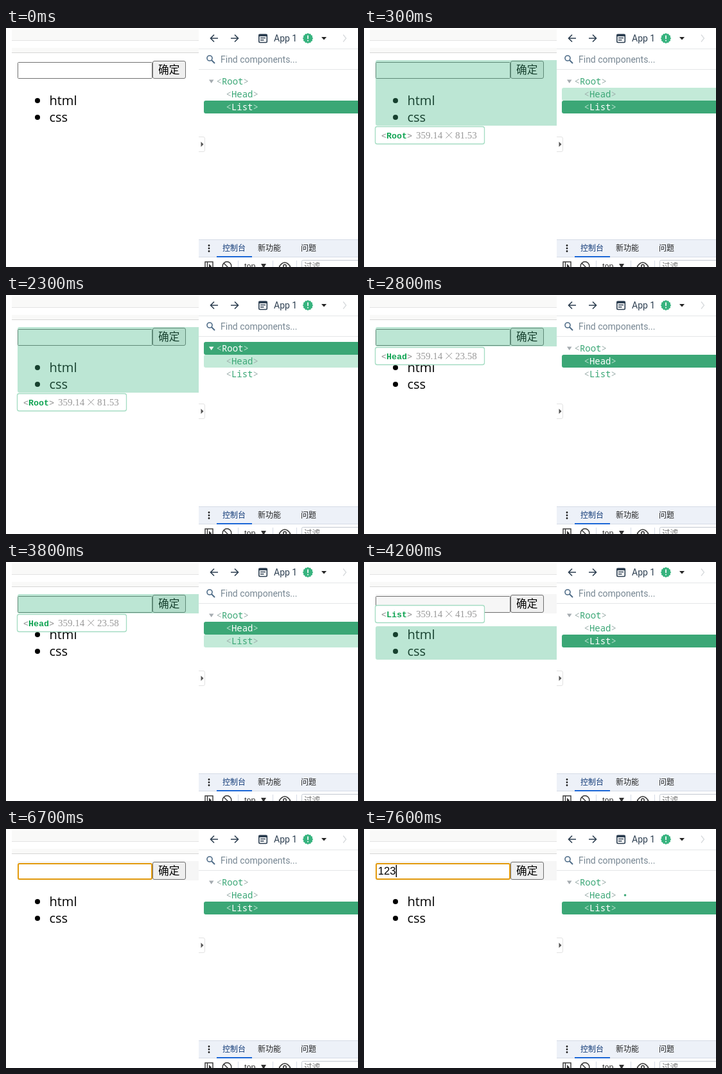
Animation, 548 px wide and 372 px high, one loop 8000 ms. Source, as an HTML page:

```html
<!DOCTYPE html>
<html lang="zh">
<head>
<meta charset="utf-8">
<title>Component inspector</title>
<style>
html, body { margin: 0; width: 100%; height: 100%; overflow: hidden; background: #fff; }
svg { display: block; }
text { white-space: pre; }
.cjk { font-family: "Noto Sans CJK SC", "Noto Sans CJK", "Noto Sans CJK JP", sans-serif; }
.list { font: 20px "Open Sans", sans-serif; }
.ui { font: 14px Roboto, sans-serif; }
.arial { font-family: "Liberation Sans", Arial, sans-serif; }
.tag { font: bold 13.3px "Liberation Mono", monospace; fill: #0fa352; }
.tag .b { font-weight: normal; fill: #8a8a8a; }
.size { font: 15px "Liberation Serif", serif; fill: #999; }
.row rect { fill: none; }
.row text { font: 14px "Noto Sans Mono", monospace; fill: #3ba776; }
.row .b { fill: #9fb0ad; }
.row.hover rect { fill: #c3ead8; }
.row.sel rect { fill: #3ba776; }
.row.sel text { fill: #fff; font-weight: 500; }
.row.sel .b { fill: #b5dfcb; font-weight: 400; }
.line { fill: none; stroke: #2c3e50; stroke-width: 1.6; }
.rule { fill: none; stroke: #e4e6e8; }
</style>
</head>
<body>
<svg width="548" height="372" viewBox="0 0 548 372">
  <rect width="548" height="372" fill="#fff"/>

  <!-- page -->
  <path d="M9 2H300V19H9Z M9 31H300V38H9Z" fill="#f9f9f8"/>
  <path d="M9 19.5H300" stroke="#e3e3e3"/>
  <path d="M9 38.5H300" stroke="#d6d6d6"/>
  <rect id="band" x="18" y="50" width="282" height="30" fill="#f6f6f6"/>
  <rect id="field" x="18.5" y="53.5" width="209" height="25" rx="1"/>
  <text id="typed" class="arial" x="21.8" y="71" font-size="16.67"></text>
  <rect id="caret" y="56" width="1.5" height="19"/>
  <rect x="228.5" y="51.5" width="51" height="27" rx="2.5" fill="#efefef" stroke="#707070"/>
  <text class="cjk" x="237" y="71" font-size="16.67">确定</text>
  <circle cx="49" cy="113" r="4"/>
  <circle cx="49" cy="139" r="4"/>
  <text class="list" x="67.5" y="120">html</text>
  <text class="list" x="67.5" y="146">css</text>

  <!-- highlight and its label -->
  <g id="overlay">
    <rect id="area" x="18" width="300" rx="3" fill="rgba(65,184,131,.35)"/>
    <g id="label">
      <rect x="17.5" y=".5" width="170" height="27" rx="3" fill="#fff" stroke="#a3dcc2" stroke-width="1.3"/>
      <text class="tag" x="27" y="18.5"><tspan class="b">&lt;</tspan><tspan id="tagName"></tspan><tspan class="b">&gt;</tspan></text>
      <text class="size" x="81" y="19">359.14</text>
      <path d="M127.5 9L137 18.5M137 9L127.5 18.5" stroke="#999"/>
      <text class="size" id="tall" x="142" y="19"></text>
    </g>
  </g>

  <!-- inspector -->
  <rect x="300" width="248" height="372" fill="#fff"/>
  <path class="rule" d="M300 32.5H548M300 64.5H548"/>
  <g class="line">
    <path d="M330 16H319M324 10.5L318.500 16L324 21.5M350 16H361M356 10.500L361.500 16L356 21.500"/>
    <rect x="393.800" y="10" width="12.500" height="12.500" rx="1.500"/>
    <path d="M393.500 11.500H406.500" stroke-width="3"/>
    <path d="M396 15.500H404M396 18.700H401.500" stroke-width="1.400"/>
  </g>
  <text class="ui" x="417" y="20.500" fill="#2c3e50">App 1</text>
  <path id="badge" fill="#36b37e"/>
  <path d="M470 11.500V17M470 18.700V20.500" stroke="#fff" stroke-width="1.700"/>
  <path d="M491 14H499L495 18.500Z" fill="#222"/>
  <path d="M525 10.500L529.500 16L525 21.500" fill="none" stroke="#d5d8db" stroke-width="1.200"/>
  <circle class="line" cx="317" cy="47" r="4" style="stroke:#4d6b87"/>
  <path class="line" d="M320 50L325 55" style="stroke:#4d6b87;stroke-width:2"/>
  <text class="ui" x="334" y="54" fill="#768692">Find components...</text>

  <g id="rows"></g>
  <path id="arrow" d="M316 80.500H323.500L319.700 86Z"/>
  <circle id="dot" cx="406.500" cy="103" r="1.800" fill="#3ba776"/>

  <path d="M300 169.500H307Q309.500 169.500 309.500 172V190Q309.500 192.500 307 192.500H300" fill="#fff" stroke="#e2e2e2"/>
  <path d="M303.500 177V185L307.500 181Z" fill="#555"/>

  <!-- console drawer -->
  <rect x="300" y="329" width="248" height="28" fill="#edf1f8"/>
  <path d="M300 329.500H548M300 356.500H548" stroke="#d5dbe6"/>
  <rect x="328" y="355" width="55" height="2" fill="#1a66d6"/>
  <g fill="#222">
    <circle cx="316" cy="338.500" r="1.400"/>
    <circle cx="316" cy="343" r="1.400"/>
    <circle cx="316" cy="347.500" r="1.400"/>
  </g>
  <g class="cjk" font-size="12" fill="#222">
    <text x="337" y="347" fill="#123b78">控制台</text>
    <text x="392" y="347">新功能</text>
    <text x="459" y="347">问题</text>
  </g>
  <g fill="none" stroke="#333" stroke-width="1.400">
    <rect x="310" y="364" width="12" height="12"/>
    <path d="M313.500 364V372"/>
    <circle cx="344" cy="370.500" r="6.800"/>
    <path d="M339 366L349 376M425.500 371Q434 359 442.500 371Q434 383 425.500 371Z"/>
    <circle cx="434" cy="370.500" r="2.300"/>
  </g>
  <path d="M316 367V375L320 371Z M397 367H405L401 374Z" fill="#333"/>
  <path d="M361.500 362V372M415.500 362V372M452.500 362V372" stroke="#d5dbe6"/>
  <text class="arial" x="371" y="374.500" font-size="12.500" fill="#333">top</text>
  <rect x="460.500" y="361.500" width="100" height="20" rx="2" fill="#fff" stroke="#c3c8d0"/>
  <text class="cjk" x="464" y="375" font-size="12.500" fill="#777">过滤</text>
</svg>
<script>
const LOOP = 8000;
const $ = id => document.getElementById(id);

// tree position, highlighted area, label position and printed height
const parts = {
  Root: { x: 327.5, row: 73, top: 50, h: 102, label: 153, tall: "81.53" },
  Head: { x: 342.5, row: 93, top: 50, h: 30, label: 81, tall: "23.58" },
  List: { x: 342.5, row: 113, top: 100, h: 52, label: 67, tall: "41.95" }
};

// each track is a list of [start time, value]
const tracks = {
  sel: [[0, "List"], [1000, "Root"], [2800, "Head"], [4200, "List"]],
  hover: [[0, ""], [200, "Root"], [300, "Head"], [400, "Root"], [2300, "Head"], [3800, "List"], [5800, ""]],
  shown: [[0, ""], [200, "Root"], [2500, "Head"], [4000, "List"], [5800, ""]],
  typed: [[0, ""], [7300, "1"], [7400, "12"], [7600, "123"]],
  caret: [[0, false], [6200, true], [6700, false], [7100, true]]
};
const at = (track, t) => track.findLast(([start]) => start <= t)[1];
const show = (id, on) => $(id).setAttribute("visibility", on ? "visible" : "hidden");
const set = (id, attrs) => {
  for (const key in attrs) $(id).setAttribute(key, attrs[key]);
};

$("rows").innerHTML = Object.entries(parts).map(([name, p]) =>
  `<g class="row" id="${name}"><rect x="308" y="${p.row}" width="250" height="20" rx="3"/>` +
  `<text x="${p.x}" y="${p.row + 15}"><tspan class="b">&lt;</tspan>${name}<tspan class="b">&gt;</tspan></text></g>`
).join("");

const rim = Array.from({ length: 24 }, (_, i) => {
  const a = i * Math.PI / 12, r = i % 2 ? 6.9 : 8.2;
  return `${(470 + r * Math.cos(a)).toFixed(1)} ${(16 + r * Math.sin(a)).toFixed(1)}`;
});
$("badge").setAttribute("d", `M${rim.join("L")}Z`);

function draw(t) {
  const s = {};
  for (const key in tracks) s[key] = at(tracks[key], t);

  for (const name in parts) {
    const state = name === s.sel ? "sel" : name === s.hover ? "hover" : "";
    $(name).setAttribute("class", `row ${state}`);
  }
  set("arrow", { fill: s.sel === "Root" ? "#fff" : "#a5abb0" });

  const part = parts[s.shown];
  show("overlay", part);
  if (part) {
    set("area", { y: part.top, height: part.h });
    set("label", { transform: `translate(0 ${part.label})` });
    $("tagName").textContent = s.shown;
    $("tall").textContent = part.tall;
  }

  const focus = t >= 6200;
  show("band", t >= 4000);
  set("field", focus
    ? { x: 19, y: 54, width: 208, height: 24, rx: 2, fill: "#fff", stroke: "#e39a0c", "stroke-width": 2 }
    : { x: 18.5, y: 53.5, width: 209, height: 25, rx: 1, fill: t < 4000 ? "#fff" : "#f6f6f6", stroke: "#707070", "stroke-width": 1 });
  $("typed").textContent = s.typed;
  set("caret", { x: 22.3 + s.typed.length * 9.1 });
  show("caret", s.caret);
  show("dot", s.typed);
}

function tick() {
  draw(performance.now() % LOOP);
  requestAnimationFrame(tick);
}
tick();
</script>
</body>
</html>
```
